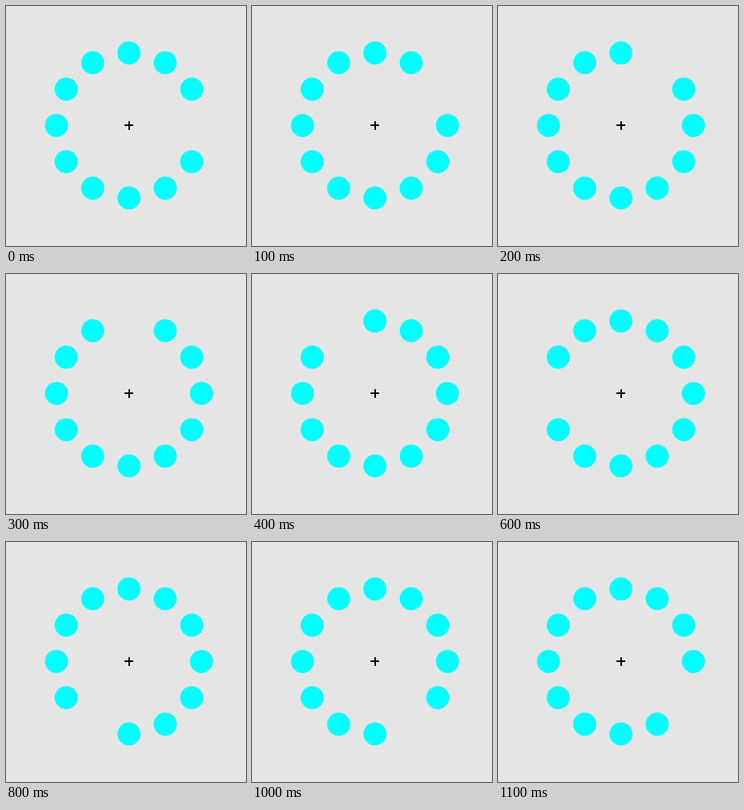
These frames come from a looping animation (300 px wide and 300 px high, 1.2 s). An HTML page with a canvas:

```html
<!DOCTYPE html>
<html>
<head>
<meta charset="utf-8">
<style>
  html, body { margin: 0; height: 100%; overflow: hidden; background: #e5e5e5; }
  canvas { display: block; }
</style>
</head>
<body>
<canvas width="300" height="300"></canvas>
<script>
const ctx = document.querySelector('canvas').getContext('2d');
const COUNT = 12, STEP = 100;
const CX = 153.7, CY = 149.3, RING = 90.6, DOT = 14.4;

function draw(time) {
  // The missing dot travels counterclockwise, starting at the right.
  const gap = Math.floor(time / STEP) % COUNT;
  ctx.fillStyle = '#e5e5e5';
  ctx.fillRect(0, 0, 300, 300);

  ctx.fillStyle = '#0ff';
  for (let i = 0; i < COUNT; i++) {
    if (i === gap) continue;
    const a = i * 2 * Math.PI / COUNT;
    ctx.beginPath();
    ctx.arc(CX + RING * Math.cos(a), CY - RING * Math.sin(a), DOT, 0, 2 * Math.PI);
    ctx.fill();
  }

  ctx.fillStyle = '#000';
  ctx.fillRect(148, 148, 11, 2);
  ctx.fillRect(153, 144, 2, 11);
}

const start = performance.now();
function tick() {
  draw(performance.now() - start);
  requestAnimationFrame(tick);
}
tick();
</script>
</body>
</html>
```
